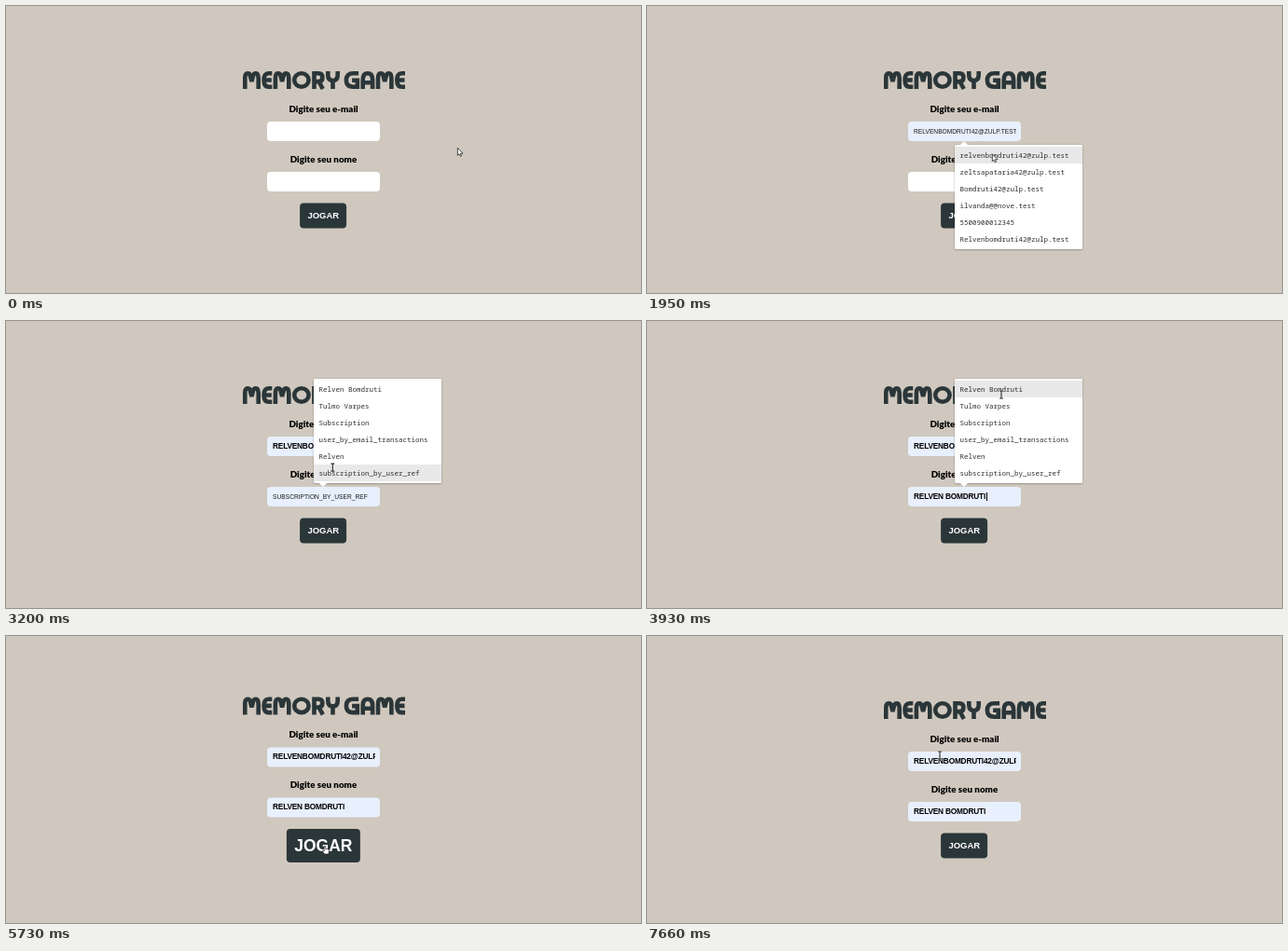
Write an HTML page that moves like this. It is 681 by 308 pixels and loops after 8000 ms.

```html
<!DOCTYPE html>
<html lang="pt-BR">
<head>
<meta charset="utf-8">
<title>Memory Game</title>
<style>
html, body { margin: 0; width: 100%; height: 100%; overflow: hidden; background: #d0c8be; }
#stage { position: relative; width: 681px; height: 308px; overflow: hidden; background: #d0c8be; cursor: default; }
#stage * { position: absolute; box-sizing: border-box; white-space: pre; }
#form { inset: 0; }
#title { left: 254px; top: 70.3px; overflow: visible; fill: none; stroke: #2b3639; stroke-width: 4.6; }
.label { left: 240px; width: 201px; text-align: center; font: 900 9.8px/14px Lato, sans-serif; color: #000; }
.field { left: 280px; width: 121px; height: 20.5px; border-radius: 4px; background: #fff; }
.field.auto { background: #e8f0fe; }
.field span { left: 6px; top: 0; width: 110px; height: 20px; overflow: hidden; color: #000; letter-spacing: -.2px;
  font: 700 8.3px/20px "Liberation Sans", Arial, sans-serif; text-transform: uppercase; }
.field.preview span { font-weight: 400; font-size: 6.667px; line-height: 21px; letter-spacing: 0; color: #1c1c1c; }
.caret { top: 5.5px; width: .7px; height: 9.5px; background: #000; }
#play { left: 340.3px; top: 225px; transform: translate(-50%, -50%); padding: 8px; border-radius: 4px;
  background: #2b3639; color: #fff; font: 700 9.5px/1.15 "Liberation Sans", Arial, sans-serif; }
.menu { left: 329.5px; width: 137.5px; height: 112px; background: #fff; border-radius: 1.5px;
  box-shadow: 0 .5px 2px rgba(0, 0, 0, .4); }
.menu::before { content: ""; position: absolute; left: 6px; border: 4.5px solid transparent; }
.menu.below::before { top: -8px; border-bottom-color: #fff; }
.menu.above::before { bottom: -8px; border-top-color: #fff; }
.menu div { left: 0; width: 100%; height: 18px; padding-left: 6px; color: #303030;
  font: 400 7.5px/18px "Noto Sans Mono", "DejaVu Sans Mono", monospace; }
.menu div.on { background: #e8e8e8; }
#pointer { left: 0; top: 0; width: 16px; height: 16px; overflow: visible; stroke-linejoin: round; }
</style>
</head>
<body>
<div id="stage">
  <div id="form">
    <svg id="title" width="175" height="20" role="img" aria-label="MEMORY GAME"></svg>
    <div class="label" style="top:102.7px">Digite seu e-mail</div>
    <div class="field" id="mail" style="top:124px"><span></span><i class="caret"></i></div>
    <div class="label" style="top:157.2px">Digite seu nome</div>
    <div class="field" id="name" style="top:178.4px"><span></span><i class="caret"></i></div>
  </div>
  <div id="play">JOGAR</div>
  <svg id="pointer">
    <g id="arrow" fill="#fff" stroke="#222" stroke-width=".8">
      <path d="M.3 .3V8.3L2.1 6.7L3.3 9.4L4.6 8.8L3.4 6.2H6Z"/>
    </g>
    <g id="beam" fill="none">
      <path d="M-2 -4H2M0 -4V4M-2 4H2" stroke="#fff" stroke-opacity=".5" stroke-width="2.2"/>
      <path d="M-2 -4H2M0 -4V4M-2 4H2" stroke="#333" stroke-width="1.2"/>
    </g>
    <g id="hand" fill="#fff" stroke="#222" stroke-width=".7">
      <path d="M-.8 5V.6Q0 -.6 .8 .6V3.4L4 4Q4.8 4.3 4.6 5.4L3.8 9H-.4L-2.8 5.8Q-2.6 4.6 -1.6 5.2L-.8 6Z"/>
    </g>
  </svg>
</div>
<script>
const $ = id => document.getElementById(id);
const LOOP = 8000;

// Title lettering: width and centre line of each glyph
const glyphs = {
  M: [19, "M2.3 19V7.5Q2.3 2.3 5 2.3T8 5L9.5 11L11 5Q11.5 2.3 14 2.3T16.7 7.5V19"],
  E: [11, "M11 2.3H7.3Q2.3 2.3 2.3 9.5T7.3 16.7H11M2.3 9.5H10.5"],
  O: [20, "M10 2.3A7.7 7.2 0 0 1 10 16.7A7.7 7.2 0 0 1 10 2.3Z"],
  R: [13.5, "M2.3 19V2.3H7Q11.2 2.3 11.2 6.7T7 11.1H4M7 10.5L11.6 19"],
  Y: [15, "M2.3 0V4Q2.3 10 7.5 10T12.7 4V0M7.5 10V19"],
  G: [16.5, "M15.5 2.3H9.8Q2.3 2.3 2.3 9.5T9.8 16.7H14.2V9.7H8.5"],
  A: [15, "M2.3 19V9.3Q2.3 2.3 7.5 2.3T12.7 9.3V19M2.3 12.3H12.7"],
  " ": [2, ""]
};
let pen = 0;
for (const c of "MEMORY GAME") {
  const [width, d] = glyphs[c];
  $("title").innerHTML += `<path d="${d}" transform="translate(${pen})"/>`;
  pen += width + 1.3;
}

function makeMenu(side, top, rows) {
  const el = document.createElement("div");
  el.className = "menu " + side;
  el.style.top = top + "px";
  el.innerHTML = rows.map((r, i) => `<div style="top:${2 + 18 * i}px">${r}</div>`).join("");
  $("stage").insertBefore(el, $("pointer"));
  return { el, top, rows };
}

const mails = makeMenu("below", 148.8, ["relvenbomdruti42@zulp.test", "zeltsapataria42@zulp.test",
  "Bomdruti42@zulp.test", "ilvanda@@nove.test", "5500900012345", "Relvenbomdruti42@zulp.test"]);
const names = makeMenu("above", 62, ["Relven Bomdruti", "Tulmo Varpes", "Subscription",
  "user_by_email_transactions", "Relven", "subscription_by_user_ref"]);

const clamp = v => Math.min(1, Math.max(0, v));
const within = (t, a, b) => t >= a && t < b;
const smooth = p => p * p * (3 - 2 * p);
const easeOut = (t, start, span) => 1 - (1 - clamp((t - start) / span)) ** 2;

// Pointer moves: start, end, x, y, new shape
const moves = [
  [170, 540, 430, 208],
  [540, 920, 376, 138, "beam"],
  [1700, 1950, 370, 158.5, "arrow"],
  [2280, 2650, 339, 187, "beam"],
  [3000, 3580, 380, 79],
  [3930, 4630, 234, 186, "arrow"],
  [4930, 5030, 266, 195],
  [5030, 5430, 342, 225, "hand"],
  [6110, 6410, 242, 203, "arrow"],
  [6830, 7050, 232, 216],
  [7050, 7350, 353, 118],
  [7350, 7550, 319, 177],
  [7550, 7660, 314, 128, "beam"]
];

function pointerAt(t) {
  let x = 484, y = 152, shape = "arrow";
  for (const [start, end, toX, toY, toShape] of moves) {
    const p = clamp((t - start) / (end - start));
    x += (toX - x) * smooth(p);
    y += (toY - y) * smooth(p);
    if (p > 0.5 && toShape) shape = toShape;
  }
  return { x, y, shape };
}

// Shows or hides a menu and returns the hovered row
function updateMenu(menu, open, y) {
  const row = open ? Math.floor((y - menu.top - 2) / 18) : -1;
  menu.el.style.display = open ? "" : "none";
  [...menu.el.children].forEach((el, i) => el.classList.toggle("on", i === row));
  return menu.rows[row];
}

function updateField(field, value, hovered, caretX) {
  const text = value || hovered || "";
  field.className = "field" + (text ? " auto" : "") + (text && !value ? " preview" : "");
  field.firstChild.textContent = text;
  field.lastChild.style.cssText = caretX ? `left:${caretX}px` : "display:none";
}

function draw(t) {
  const { x, y, shape } = pointerAt(t);
  const mail = updateMenu(mails, within(t, 1360, 2280), y);
  const name = updateMenu(names, within(t, 2650, 4030), y);
  const named = t >= 3850;
  updateField($("mail"), t >= 2280 && mails.rows[0], mail, within(t, 920, 1360) ? 6 : 0);
  updateField($("name"), named && names.rows[0], name,
    named ? (t < 4630 ? 84 : 0) : within(t, 2650, 3000) ? 6 : 0);

  // The hovered button grows and pushes the centred column up
  const grow = 8 * (easeOut(t, 5130, 300) - easeOut(t, 6185, 300));
  $("play").style.fontSize = 9.5 + grow + "px";
  $("form").style.transform = grow > 0.01 ? `translateY(${-grow * 1.15 / 2}px)` : "none";

  $("pointer").style.transform = `translate(${x}px, ${y}px)`;
  for (const s of ["arrow", "beam", "hand"]) $(s).style.display = s === shape ? "" : "none";
}

const start = performance.now();
function tick() {
  draw((performance.now() - start) % LOOP);
  requestAnimationFrame(tick);
}
tick();
</script>
</body>
</html>
```
